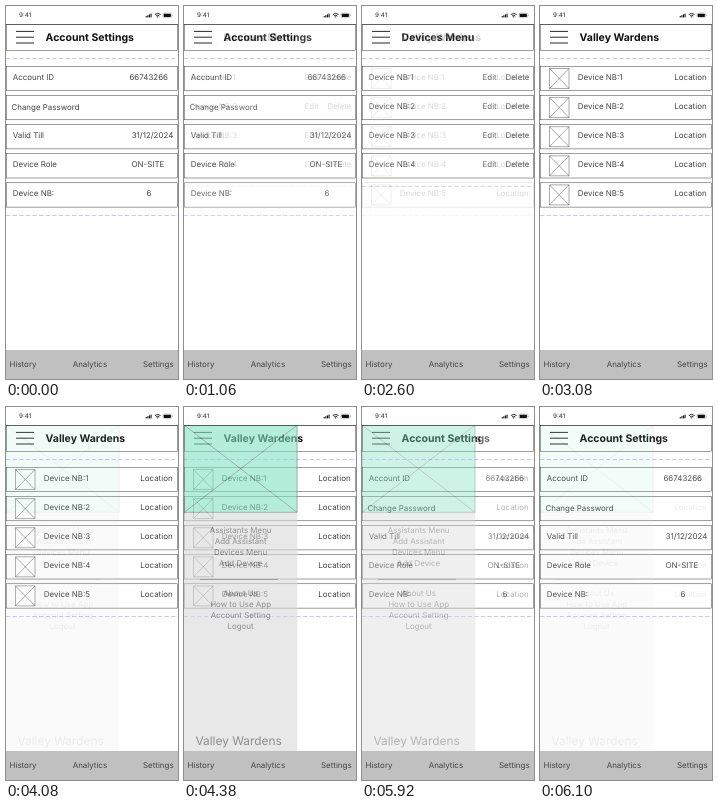
These frames come from a looping animation (172x373 px, 6160 ms). An HTML page:

```html
<!DOCTYPE html>
<html lang="en">
<head>
<meta charset="utf-8">
<title>App screens</title>
<style>
html, body { margin: 0; width: 100%; height: 100%; overflow: hidden; background: #fff; }
svg { display: block; width: 100vw; height: 100vh; }
text { font: 400 7.94px Inter, Roboto, sans-serif; fill: #444; white-space: pre; text-rendering: geometricPrecision; }
.title { font-size: 10.5px; font-weight: 700; fill: #111; }
.brand { font-size: 11.9px; }
.clock { font-size: 6.2px; font-weight: 500; }
.box { fill: #fff; stroke: #222; stroke-width: .44; }
.dash { stroke: #d2c2fb; stroke-dasharray: 4.4 2.2; }
.thin { fill: none; stroke: #222; stroke-width: .5; }
.icon { fill: none; stroke: #333; stroke-width: .42; }
.bar { stroke: #111; stroke-width: .9; }
</style>
</head>
<body>
<svg id="stage" viewBox="0 0 172 373"></svg>
<script>
const APP = 'Valley Wardens';
const STEP = 60, STEPS = 10, LOOP = 6160;

const text = (x, y, s, cls = '', anchor = 'start') =>
  `<text x="${x}" y="${y}" class="${cls}" text-anchor="${anchor}">${s}</text>`;
const line = (x1, y1, x2, y2, cls) =>
  `<path d="M${x1} ${y1}L${x2} ${y2}" class="${cls}"/>`;
const rect = (x, y, w, h, attrs) =>
  `<rect x="${x}" y="${y}" width="${w}" height="${h}" ${attrs}/>`;
const layer = (id, body) => `<g id="${id}">${body}</g>`;
const cross = (x, y, w, h, cls) =>
  `<path class="${cls}" d="M${x} ${y}h${w}v${h}h${-w}zl${w} ${h}m0 ${-h}l${-w} ${h}"/>`;

const rowTop = i => 60.4 + 29.1 * i;

// Each row is a list of [x, label, dy, anchor]
function screen(id, title, rows, icons) {
  let out = rect(0, 18, 172, 326, 'fill="#fff"');
  out += rect(.3, 18.5, 171.4, 26, 'class="box"');
  for (const y of [25.4, 31.2, 37]) out += line(10, y, 28, y, 'bar');
  out += text(39.6, 35, title, 'title');
  out += line(0, 52.5, 172, 52.5, 'dash');
  rows.forEach((cells, i) => {
    const y = rowTop(i);
    out += rect(.3, y, 171.4, 24.3, 'class="box"');
    if (icons) out += cross(9.5, y + 2.1, 19.5, 20, 'icon');
    for (const [x, s, dy = 0, anchor] of cells) out += text(x, y + 13.4 + dy, s, '', anchor);
  });
  const end = rowTop(rows.length) + 3.6;
  out += line(0, end, 172, end, 'dash');
  return layer(id, out);
}

const account = screen('account', 'Account Settings', [
  [[6.7, 'Account ID'], [162, '66743266', 0, 'end']],
  [[5.4, 'Change Password', 1]],
  [[6.7, 'Valid Till'], [167.3, '31/12/2024', 0, 'end']],
  [[6.7, 'Device Role'], [158.3, 'ON-SITE', 0, 'end']],
  [[6.7, 'Device NB:'], [140.6, '6']]
]);

const devices = screen('devices', 'Devices Menu', [1, 2, 3, 4].map(n =>
  [[6.7, 'Device NB:' + n], [120.5, 'Edit'], [167.5, 'Delete', 0, 'end']]));

const home = screen('home', APP, [1, 2, 3, 4, 5].map(n =>
  [[37.8, 'Device NB:' + n], [166.6, 'Location', 0, 'end']]), true);

function sidebar() {
  const groups = [
    [126.2, ['Assistants Menu', 'Add Assistant', 'Devices Menu', 'Add Device']],
    [189.2, ['About Us', 'How to Use App', 'Account Setting', 'Logout']]
  ];
  let out = rect(0, 18, 113.3, 326, 'fill="#d9d9d9"');
  out += rect(0, 18, 113.3, 87.5, 'fill="#83e2c2"') + cross(.3, 18.3, 112.7, 87, 'thin');
  for (const [y, items] of groups)
    items.forEach((s, i) => out += text(56.6, y + 10.9 * i, s, '', 'middle'));
  out += line(16, 172.5, 94, 172.5, 'thin');
  out += text(11.4, 338, APP, 'brand');
  return layer('sidebar', out);
}

function chrome() {
  let out = rect(0, 0, 172, 18, 'fill="#fff"') + line(0, 18.5, 172, 18.5, 'thin');
  out += text(13, 11.3, '9:41', 'clock');
  for (let i = 0; i < 4; i++) out += rect(139.7 + 1.6 * i, 10 - .8 * i, 1.1, 1.4 + .8 * i, 'fill="#111"');
  out += '<path d="M148.8 8.6q2.9-2.6 5.8 0M150 10q1.7-1.4 3.4 0" fill="none" stroke="#111" stroke-width=".9"/>';
  out += '<circle cx="151.7" cy="10.9" r=".6" fill="#111"/>';
  out += rect(157, 7, 8.6, 4.6, 'rx="1.2" fill="none" stroke="#888" stroke-width=".4"');
  out += rect(157.7, 7.7, 7.2, 3.2, 'rx=".6" fill="#111"') + rect(166, 8.6, .5, 1.5, 'fill="#888"');
  out += rect(0, 344, 172, 29, 'fill="#c0c0c0"');
  out += text(3.6, 361, 'History') + text(66.7, 361, 'Analytics') + text(167.6, 361, 'Settings', '', 'end');
  return out;
}

const stage = document.getElementById('stage');
stage.innerHTML = home + devices + sidebar() + account + chrome();
const show = (id, opacity) => {
  const el = document.getElementById(id);
  el.style.opacity = opacity;
  el.style.display = opacity > 0 ? '' : 'none';
};

// Stepped dissolve: 0 before the start, 1 from the tenth step on
const fade = (t, start) =>
  Math.max(0, Math.min(STEPS, Math.floor((t - start) / STEP) + 1)) / STEPS;

function draw(t) {
  const toDevices = fade(t, 1000), toHome = fade(t, 2540);
  const menu = fade(t, 4080), toAccount = fade(t, 5620);
  show('devices', 1 - toHome);
  show('sidebar', menu);
  show('account', t < 2540 ? 1 - toDevices : toAccount);
}

function tick(now) {
  draw(now % LOOP);
  requestAnimationFrame(tick);
}
draw(0);
requestAnimationFrame(tick);
</script>
</body>
</html>
```
